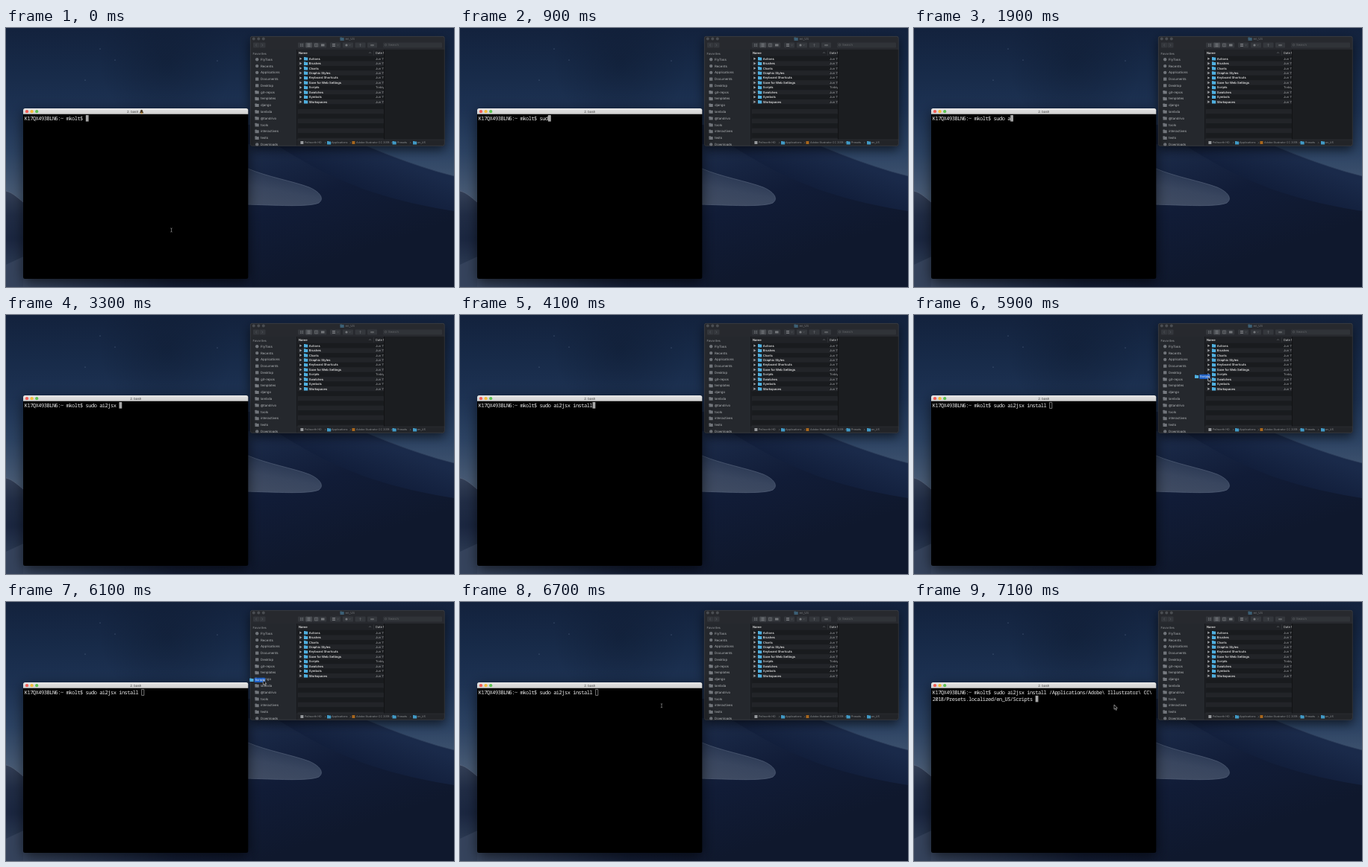
Recreate the animation shown at these times as an HTML page with a canvas. Size 600 px wide and 348 px high, loop 8 s.

```html
<!DOCTYPE html>
<html lang="en">
<head>
<meta charset="utf-8">
<title>Terminal install</title>
<style>
html, body { margin: 0; width: 100%; height: 100%; overflow: hidden; background: #16233f; }
canvas { display: block; }
</style>
</head>
<body>
<canvas id="stage" width="600" height="348"></canvas>
<script>
const ctx = document.getElementById('stage').getContext('2d');
const LOOP = 8000, STEP = 100;
const SANS = 'Inter, "Liberation Sans", sans-serif';
const MONO = '"Noto Sans Mono", "DejaVu Sans Mono", monospace';
const CELL = 3.72, ROW = 8.8;

const PROMPT = 'K17QX493BLN6:~ mkolt$ ';
const COMMAND = 'sudo ai2jsx install ';
const DROPPED = ['/Applications/Adobe\\ Illustrator\\ CC\\', '2018/Presets.localized/en_US/Scripts '];
const KEY_TIMES = [600, 800, 900, 1000, 1200, 1900, 2100, 2500, 2700, 2900, 3100, 3300,
  3500, 3500, 3700, 3800, 3900, 4000, 4100, 4300];
const DRAG_START = 5700, DROP = 6700, PASTE = 6800;
// time, x, y of the pointer tip
const POINTER = [[4700, 221, 271], [5100, 440, 67], [5400, 417, 80], [DRAG_START, 417, 80],
  [5900, 394, 83], [6400, 270, 138], [DROP, 270, 138]];

const FILES = ['Actions', 'Brushes', 'Charts', 'Graphic Styles', 'Keyboard Shortcuts',
  'Save for Web Settings', 'Scripts', 'Swatches', 'Symbols', 'Workspaces'];
const PLACES = ['FlyToss', 'Recents', 'Applications', 'Documents', 'Desktop', 'git-repos', 'templates',
  'django', 'lambda', '@tandrivo', 'tools', 'interactives', 'tests', 'Downloads'];

function rect(x, y, w, h, fill, r = 0) {
  ctx.fillStyle = fill;
  ctx.beginPath();
  ctx.roundRect(x, y, w, h, r);
  ctx.fill();
}

function dot(x, y, r, fill) {
  ctx.fillStyle = fill;
  ctx.beginPath();
  ctx.arc(x, y, r, 0, 7);
  ctx.fill();
}

function text(s, x, y, size, fill, align = 'left', weight = 400) {
  ctx.font = `${weight} ${size}px ${SANS}`;
  ctx.textAlign = align;
  ctx.fillStyle = fill;
  ctx.fillText(s, x, y);
}

function line(d, stroke, width = .6) {
  ctx.strokeStyle = stroke;
  ctx.lineWidth = width;
  ctx.stroke(new Path2D(d));
}

function shape(d, fill) {
  ctx.fillStyle = fill;
  ctx.fill(new Path2D(d));
}

function gradient(x0, y0, x1, y1, ...colors) {
  const g = ctx.createLinearGradient(x0, y0, x1, y1);
  colors.forEach((c, i) => g.addColorStop(i / (colors.length - 1), c));
  return g;
}

function shadowed(blur, draw) {
  ctx.save();
  ctx.shadowColor = 'rgba(0,0,0,.6)';
  ctx.shadowBlur = blur;
  ctx.shadowOffsetY = 5;
  draw();
  ctx.restore();
}

function folder(x, y, fill = '#4fb0e0') {
  rect(x, y - 2.3, 2.4, 2, fill, .4);
  rect(x, y - 1.7, 5.2, 4, fill, .5);
}

function desert() {
  rect(0, 0, 600, 348, gradient(0, 0, 0, 224, '#13223d', '#172a48', '#1d3253', '#2c4363', '#485b75'));
  const cloud = ctx.createRadialGradient(215, 45, 5, 215, 45, 90);
  cloud.addColorStop(0, 'rgba(14,26,48,.45)');
  cloud.addColorStop(1, 'rgba(14,26,48,0)');
  rect(100, 0, 230, 108, cloud);
  [[126, 28], [106, 70], [146, 43], [283, 44]].forEach(([x, y]) => dot(x, y, .5, '#6f829f'));

  // great dune on the right, its shaded flank and the hollow below
  shape('M320 130H420C480 158 540 184 600 199V348H320Z', gradient(440, 150, 400, 260, '#1a2a4a', '#101c38', '#0f1932'));
  line('M420 130C480 158 540 184 600 199', '#2c3d5a', .8);
  shape('M360 156C410 186 470 226 600 246V348H320V156Z', gradient(330, 156, 390, 330, '#1c2c4b', '#111c37', '#0f182d'));
  // lit tongue
  shape('M320 188C350 200 385 206 406 214C420 220 427 229 419 235C405 241 360 238 320 237Z',
    gradient(370, 198, 362, 240, '#2a3853', '#39465f', '#3f4b62'));
  line('M324 189C350 200 385 206 406 214C420 220 427 229 419 235C405 241 360 238 320 237', '#55627a', .7);

  // left edge
  shape('M0 219C9 221 17 229 30 240V348H0Z', gradient(0, 219, 0, 348, '#333f56', '#202c45', '#1a2640', '#293750', '#3c4a63'));
  line('M0 219C9 221 17 229 30 240', '#58657c', .8);
  shape('M0 318L30 304V348H0Z', '#35435c');
  rect(23, 330, 307, 18, gradient(23, 0, 330, 0, '#3a4861', '#26334d', '#141e37', '#101930'));
}

function toolbar() {
  const button = '#34373c', glyph = '#74777b';
  [[331, 8], [339.5, 8], [434, 14], [451, 14], [467.5, 14], [484, 13]].forEach(([x, w]) => rect(x, 19.5, w, 7, button, 1));
  [391, 401, 411, 420].forEach((x, i) => rect(x, 19.5, 9.2, 7, i === 1 ? '#494c51' : button, 1));
  line('M336 21.5l-1.6 1.5l1.6 1.5M342.5 21.5l1.6 1.5l-1.6 1.5', '#5c5f63');
  line('M394 21.8h1.5m1 0h1.5M394 24.2h1.5m1 0h1.5', glyph, 1.2);
  line('M403.5 21.3h4m-4 1.7h4m-4 1.7h4', '#94979a', .6);
  line('M413.5 21h4v4h-4zM415.5 21v4', glyph, .7);
  rect(422, 21.5, 4.5, 3, glyph);
  line('M437 21.8h4M437 24.2h4', glyph, 1.5);
  dot(456, 23, 1.6, glyph);
  line('M443.5 22.4l1 1l1-1M459.5 22.4l1 1l1-1M474.5 25v-3.5m-1.2 1l1.2-1.2l1.2 1.2', '#66696d');
  rect(488, 22, 5, 2.2, '#5c5f63', 1);
  rect(505, 19.5, 79, 7, '#303338', 1.2);
  ctx.strokeStyle = '#66696d';
  ctx.lineWidth = .5;
  ctx.beginPath();
  ctx.arc(508.5, 22.7, 1.2, 0, 7);
  ctx.stroke();
  text('Search', 512, 23.2, 4.2, '#66696d');
}

function finder() {
  shadowed(14, () => rect(327, 11, 260.5, 147.5, '#1d1f23', 2.5));
  ctx.save();
  ctx.beginPath();
  ctx.roundRect(327, 11, 260.5, 147.5, 2.5);
  ctx.clip();
  rect(327, 11, 260.5, 18, '#27292e');
  [331.8, 338.3, 344.8].forEach(x => dot(x, 14.6, 2, '#4a4d52'));
  folder(447.5, 14.8, '#3c5f75');
  text('en_US', 454.5, 15, 4.2, '#777a7e');
  toolbar();

  rect(327, 29, 62.5, 130, '#25282d');
  text('Favorites', 330.5, 34.7, 4.2, '#85888c', 'left', 500);
  PLACES.forEach((name, i) => {
    const y = 42.3 + i * 8.78;
    if (i < 5 || i === 13) rect(334, y - 2.2, 4.4, 4.4, '#70747a', i < 3 || i === 13 ? 2.2 : .6);
    else folder(333.5, y, '#777b81');
    text(name, 341, y + .2, 4.4, '#b5b8bb');
  });

  rect(389.5, 29, 198, 8.5, '#202226');
  text('Name', 392, 33.3, 4.1, '#e2e2e2', 'left', 600);
  line('M486 34l1.5-1.4l1.5 1.4', '#85888c', .5);
  rect(492, 30, .5, 7, '#3c3f43');
  ctx.save();
  ctx.beginPath();
  ctx.rect(389.5, 29, 116.5, 121);
  ctx.clip();
  text('Date Modified', 495, 33.3, 4.1, '#d0d0d0');
  for (let i = 0; i < 18; i++) {
    const y = 41.2 + i * 6.45;
    rect(391, y - 3.2, 115, 6.45, i % 2 ? '#222428' : '#191b1e', .7);
    if (!FILES[i]) continue;
    shape(`M393.3 ${y - 1.8}l3 1.8l-3 1.8z`, '#a5a7aa');
    folder(399, y);
    text(FILES[i], 405.8, y + .2, 4.1, '#f4f4f4', 'left', 500);
    text(FILES[i] === 'Scripts' ? 'Today' : 'Jun 11', 495, y + .2, 4.1, '#a2a4a7');
  }
  ctx.restore();
  rect(506, 29, 82, 121, '#1b1d20');
  rect(506, 29, .7, 121, '#0f1012');
  rect(389, 29, .6, 130, '#121416');
  pathBar();
  ctx.restore();
  ctx.strokeStyle = 'rgba(150,155,165,.28)';
  ctx.lineWidth = .6;
  ctx.beginPath();
  ctx.roundRect(327.3, 11.3, 260, 147, 2.5);
  ctx.stroke();
}

function pathBar() {
  rect(389.5, 150, 198, 9, '#222428');
  rect(389.5, 149.7, 198, .5, '#33363a');
  rect(394.4, 151.9, 4, 4.2, '#96999c', .6);
  rect(463.4, 152, 4, 4, '#a8671d');
  [430, 517.5, 545].forEach(x => folder(x, 154.2, '#419ac6'));
  [['Pellworth HD', 400], ['Applications', 436], ['Adobe Illustrator CC 2018', 469],
    ['Presets', 524], ['en_US', 551]].forEach(([s, x]) => text(s, x, 154.3, 3.7, '#8b8e91'));
  [427, 460.7, 515.5, 541].forEach(x => line(`M${x} 153l1.2 1.2l-1.2 1.2`, '#75787b', .5));
}

function terminal(t) {
  shadowed(18, () => rect(23, 108, 301.3, 229, '#000', 2.5));
  rect(23, 108, 301.3, 7.8, gradient(0, 108, 0, 116, '#e6e6e6', '#cfcfcf'), [2.5, 2.5, 0, 0]);
  ['#f45f57', '#f6bd3b', '#5fc454'].forEach((c, i) => dot(28 + i * 6.6, 112.2, 2.1, c));
  const bell = t < 200;
  text('2. bash', bell ? 162 : 173.8, 112.3, 4.4, '#3c3c3c', bell ? 'left' : 'center');
  if (bell) {
    shape('M178.7 114.2Q180 113 180 111.5Q180.2 109.7 181.6 109.7Q183 109.7 183.2 111.5Q183.2 113 184.5 114.2Z', '#4b3a22');
    dot(181.6, 114.4, .9, '#dc9a28');
  }
  const typed = KEY_TIMES.filter(k => k <= t).length;
  const lines = [PROMPT + COMMAND.slice(0, typed)];
  if (t >= PASTE) {
    lines[0] += DROPPED[0];
    lines.push(DROPPED[1]);
  }
  ctx.font = `500 7px ${MONO}`;
  ctx.textAlign = 'left';
  ctx.fillStyle = '#f0f0f0';
  lines.forEach((s, row) => [...s].forEach((c, col) => ctx.fillText(c, 24.7 + col * CELL, 122 + row * ROW)));

  const x = 25 + lines.at(-1).length * CELL, y = 117 + (lines.length - 1) * ROW;
  if (t >= DRAG_START && t < PASTE) line(`M${x + .4} ${y + .4}h3.2v8h-3.2z`, '#a8a8a8', .7);
  else rect(x, y, 3.8, 8.6, '#a6a6a6');
}

function arrow(x, y) {
  const d = `M${x} ${y}v6.2l1.4-1.2l1.1 2.4l1-.5l-1.1-2.3h2z`;
  shape(d, '#000');
  line(d, '#e8e8e8', .55);
}

function iBeam(x, y) {
  line(`M${x - 1.2} ${y - 2.6}q1.2 0 1.2.7q0-.7 1.2-.7M${x} ${y - 2.2}v4.4M${x - 1.2} ${y + 2.6}q1.2 0 1.2-.7q0 .7 1.2.7`, '#a4a4a4', .6);
}

function pointerAt(t) {
  const i = POINTER.findIndex(p => p[0] > t);
  const [t0, x0, y0] = POINTER[i - 1], [t1, x1, y1] = POINTER[i];
  const k = (t - t0) / (t1 - t0);
  return [x0 + (x1 - x0) * k, y0 + (y1 - y0) * k];
}

function pointer(t) {
  if (t < 600) return iBeam(221.5, 271.5);
  if (t < 4700) return;
  if (t >= PASTE) return arrow(268, 138);
  if (t >= DROP) return iBeam(270, 139.3);
  const [x, y] = pointerAt(t);
  if (t >= DRAG_START) {
    folder(x - 18, y - .3);
    rect(x - 11.8, y - 3.2, 14.6, 6.2, '#1c5fc6', 1);
    text('Scripts', x - 11, y, 4.1, '#fff');
  }
  const overTerminal = t < DRAG_START && x < 324 && y > 117;
  (overTerminal ? iBeam : arrow)(x, y);
}

function frame() {
  const t = Math.floor((performance.now() - start) % LOOP / STEP) * STEP;
  ctx.textBaseline = 'middle';
  ctx.textRendering = 'geometricPrecision';
  desert();
  finder();
  terminal(t);
  pointer(t);
  requestAnimationFrame(frame);
}

const start = performance.now();
frame();
</script>
</body>
</html>
```
